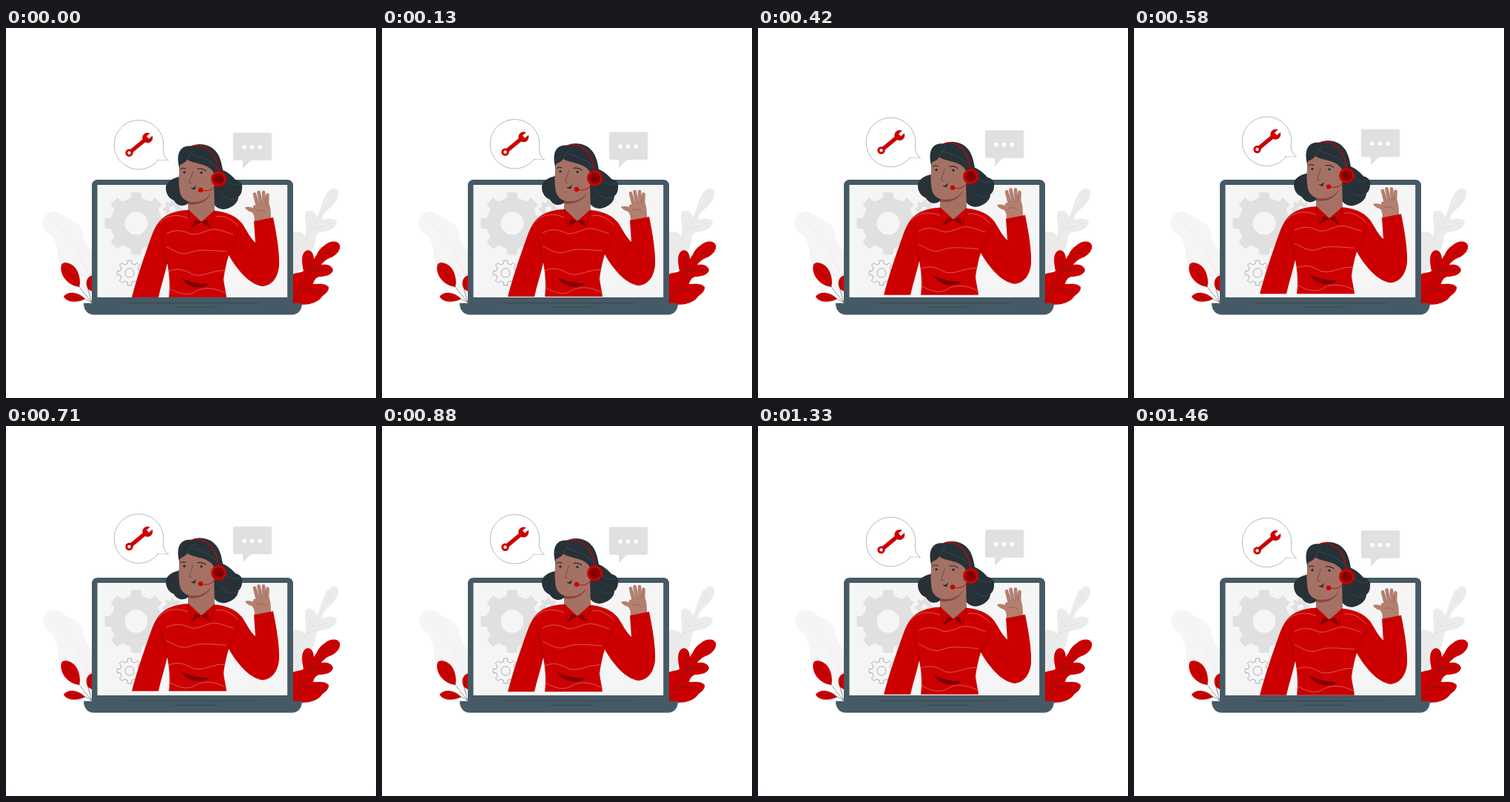
An HTML page for the animation above (1500 ms loop, 500 by 500 pixels).

```html
<!DOCTYPE html>
<html lang="en">
<head>
<meta charset="utf-8">
<title>Video support</title>
<style>
  html, body { margin: 0; width: 100%; height: 100%; overflow: hidden; background: #fff; }
  svg { display: block; width: 100%; height: 100%; }
  .red { fill: #c00; }
  .maroon { fill: #800000; }
  .dark { fill: #263238; }
  .slate { fill: #455a64; }
  .grey { fill: #e0e0e0; }
  .pale { fill: #f5f5f5; }
  .skin { fill: #a57164; }
  .hand { fill: #b57f6e; }
  .line { fill: none; stroke: #263238; stroke-width: .5; stroke-linecap: round; }
  .thin { stroke-width: .35; }
  .brow { stroke-width: 1.2; }
  .strand { fill: none; stroke: #455a64; stroke-width: .5; }
  .seam { fill: none; stroke: #8a0000; stroke-width: .6; }
  .stripe { fill: none; stroke: #f0a8a8; stroke-width: .5; }
  .fingers { fill: none; stroke: #b57f6e; stroke-width: 4.6; stroke-linecap: round; }
</style>
</head>
<body>
<svg viewBox="0 0 500 500">
  <!-- plants -->
  <path class="pale" d="M50 262C52 246 72 244 80 256C90 262 102 262 104 278C105 290 113 296 117 308V365C100 350 76 335 71 312C69 300 70 290 60 279C53 274 50 268 50 262Z"/>
  <path d="M66 262C88 282 104 312 116 344" fill="none" stroke="#e0e0e0" stroke-width=".5"/>
  <path fill="#ebebeb" d="M387 340V276C395 274 401 276 404 281C407 274 404 262 404 252C406 243 418 246 420 256C424 250 425 240 430 230C434 220 442 214 448 218C452 224 446 236 438 243C430 250 426 255 428 260C434 257 444 256 447 262C447 270 436 275 426 276C419 277 418 282 418 290C414 304 402 322 387 340Z"/>
  <path d="M441 226C426 252 412 275 392 302M409 256L415 272M440 264L415 272" fill="none" stroke="#dedede" stroke-width=".6"/>
  <path class="red" d="M387 374V333C393 330 400 331 402 328C400 318 398 306 405 301C411 298 416 304 416 312C420 308 421 300 430 294C438 287 448 287 451 293C453 300 446 308 437 311C432 313 428 317 426 320C433 318 441 321 442 327C441 334 430 336 424 336C418 337 416 342 415 346C421 346 431 344 436 350C437 356 430 360 427 363C422 371 410 374 398 374Z"/>
  <path class="line" d="M440 298C420 316 402 342 389 369M411 307L411 329M440 326L410 329M428 355C416 352 404 353 398 354"/>
  <path class="red" d="M75 320C78 314 90 318 95 326C100 334 101 345 99 350C90 349 78 342 75 330C74 326 74 322 75 320ZM78 363C82 356 96 355 107 366C100 371 82 372 78 363ZM118 334C109 335 106 345 111 353L118 357Z"/>
  <path class="line" d="M80 323L99 350L116 371M84 363L107 366L116 371M113 342L111 353L116 371"/>

  <!-- laptop -->
  <rect class="slate" x="116" y="205" width="272" height="172" rx="7.5"/>
  <rect class="pale" x="123.5" y="212" width="256.7" height="152"/>
  <path class="slate" d="M105 371.700H400C400 381 395 387.400 386 387.400H119C110 387.400 105 381 105 371.700Z"/>
  <path class="line" d="M164 371.5H340M229 377.3H282L285 372.5"/>

  <!-- gears -->
  <path class="grey gear" data-gear="176 264 43 35 15.5"/>
  <path class="grey gear" data-gear="225 245 13 10 4"/>
  <path class="line thin gear" data-gear="167 331 17 13 6" stroke-dasharray="2 .6"/>

  <g id="floating">
    <!-- speech bubbles -->
    <path d="M212.7 157.7A33.3 33.3 0 1 0 206 178L219 179C214 174 211 168 212.7 157.7Z" fill="#fff"/>
    <path class="line thin" d="M206 178A33.3 33.3 0 1 1 212.7 160C211 168 214 174 219 179"/>
    <path class="line thin" d="M206 178.6H219" stroke-dasharray="1 2"/>
    <g fill="none" stroke="#c00">
      <circle cx="166.5" cy="168.7" r="3.7" stroke-width="3"/>
      <path d="M169.5 166.3L188 151" stroke-width="5.4"/>
    </g>
    <circle class="red" cx="191.3" cy="148.4" r="7"/>
    <path d="M191.5 148L199 141.5" stroke="#fff" stroke-width="4.6"/>
    <path class="grey" d="M309 141.5H357Q359 141.5 359 143.5V177Q359 179 357 179H331L320 190V179H309Q307 179 307 177V143.5Q307 141.5 309 141.5Z"/>
    <g fill="#fff">
      <circle cx="322" cy="161" r="2.8"/><circle cx="332.5" cy="161" r="2.8"/><circle cx="343" cy="161" r="2.8"/>
    </g>

    <!-- hand -->
    <path class="hand" d="M334 240L355 236C358 243 358 250 358 259L336 262C336 255 335 251 332 249C328 248 325 246 323 243C325 241 330 242 334 243Z"/>
    <path class="fingers" d="M336 224.500L340 241M341.5 222L344.500 239M348 222L349 239M353.5 225.500L353 240"/>
    <path class="line" d="M339 228L342 239M345 226L346.500 238M351 227L351 238M339 247Q345 244 351 249" opacity=".6"/>

    <!-- hair and neck -->
    <path class="dark" d="M234 188C231 176 232 163 243 160C247 159 249 160 252 159C260 155 275 157 282 165C290 173 291 183 293 192C299 194 306 200 310 205C317 207 320 211 319 216C319 222 317 226 314 228C314 238 302 245 293 245C286 244 282 241 280 236L246 237C241 242 231 241 227 233C220 230 216 224 216 216C216 208 225 203 234 201Z"/>
    <path class="strand" d="M296 205C303 212 309 214 316 211M290 222C297 231 304 233 312 230"/>
    <path class="skin" d="M246 228L246 249L264 266L282 249L281 212Z"/>

    <!-- jumper -->
    <path class="red" d="M170 364C177 337 187 308 196 283C202 266 209 255 224 250C234 246.500 242 246 247 246L264 262L281 247C296 248 310 253 319 264C325 273 330 284 337 290L335 261L361 256C366 280 370 305 369 322C367 340 357 349 346 349C328 346 312 326 301 307C297 320 295 332 294 340C295 348 297 356 298 364H220C222 350 221 335 218 318C214 335 209 350 206 364Z"/>
    <path class="stripe" d="M207 264C213 254 230 250 246 257M284 255C295 252 306 259 314 268M217 278C228 272 238 273 248 278C259 282 270 272 282 272C292 273 300 277 307 279M217 296C226 299 236 309 250 303C262 298 280 301 298 302M219 329C232 324 240 326 252 333C266 338 280 326 297 328M221 352C232 358 245 364 258 355C268 350 282 351 296 358"/>
    <path class="seam" d="M209 279L218 318M315 274L301 307M337 290L332 300M336 266L361 261"/>
    <path class="maroon" d="M236 337C248 343 260 346 274 346C271 351 262 351 254 350C246 348 240 343 236 337Z"/>
    <path class="red" d="M246 245.500L251 270L264 262ZM282 246.500L276 270L264 262Z"/>
    <path class="maroon" d="M251 270L255 259L264 262ZM276 270L272 259L264 262Z"/>
    <path class="seam" d="M246 245.500L251 270M276 270L282 246.500"/>

    <!-- face -->
    <path d="M246 232C258 237 270 230 278 221C273 236 258 240 246 238Z" fill="#83483c"/>
    <path class="skin" d="M235 185C239 183 243 181 245 178C256 184 268 183 276 190C281 194 283 199 283 205L281 218C274 229 266 235 256 235C245 236 237 231 235 222C233 212 233 200 235 185Z"/>
    <circle class="dark" cx="241" cy="195" r="1.700"/>
    <circle class="dark" cx="264" cy="195.500" r="1.700"/>
    <path class="line brow" d="M236.500 190.500Q239 188.500 243 190M259 190.500Q265 189 270 193"/>
    <path class="line" d="M252.500 194L247.500 209L251.500 210.500"/>
    <path class="dark" d="M249 216Q254 217 257 212L255.500 218.500Q252 218.500 249 216Z"/>
    <path class="strand" d="M245 178C247 172 250 168 254 165M250 170C264 176 278 178 286 190"/>

    <!-- headset -->
    <path d="M250 160C268 154 285 169 287 194" fill="none" stroke="#c00" stroke-width="1.300"/>
    <path d="M264 219C273 222 281 218 283 211" fill="none" stroke="#c00"/>
    <circle class="red" cx="263" cy="219" r="3.200"/>
    <circle class="red" cx="287.500" cy="204" r="10.500"/>
    <circle class="maroon" cx="287.500" cy="204" r="7"/>
  </g>
</svg>
<script>
  const LOOP = 1500, LIFT = 6, TEETH = 8;

  function gearPath(cx, cy, outer, inner, hole) {
    const point = (radius, turn) => {
      const angle = turn * 2 * Math.PI / TEETH;
      return `${cx + radius * Math.sin(angle)} ${cy - radius * Math.cos(angle)}`;
    };
    let path = '';
    for (let i = 0; i < TEETH; i++) {
      const corners = [point(inner, i - .28), point(outer, i - .19), point(outer, i + .19), point(inner, i + .28)];
      path += (i ? 'L' : 'M') + corners.join('L');
    }
    return `${path}ZM${cx - hole} ${cy}a${hole} ${hole} 0 1 0 ${2 * hole} 0a${hole} ${hole} 0 1 0 ${-2 * hole} 0Z`;
  }

  for (const gear of document.querySelectorAll('.gear')) {
    gear.setAttribute('d', gearPath(...gear.dataset.gear.split(' ').map(Number)));
    gear.setAttribute('fill-rule', 'evenodd');
  }

  const floating = document.getElementById('floating');
  function draw() {
    const phase = performance.now() % LOOP / LOOP;
    const lift = LIFT * (1 - Math.abs(1 - 2 * phase));
    floating.setAttribute('transform', `translate(0 ${-lift})`);
    requestAnimationFrame(draw);
  }
  draw();
</script>
</body>
</html>
```
